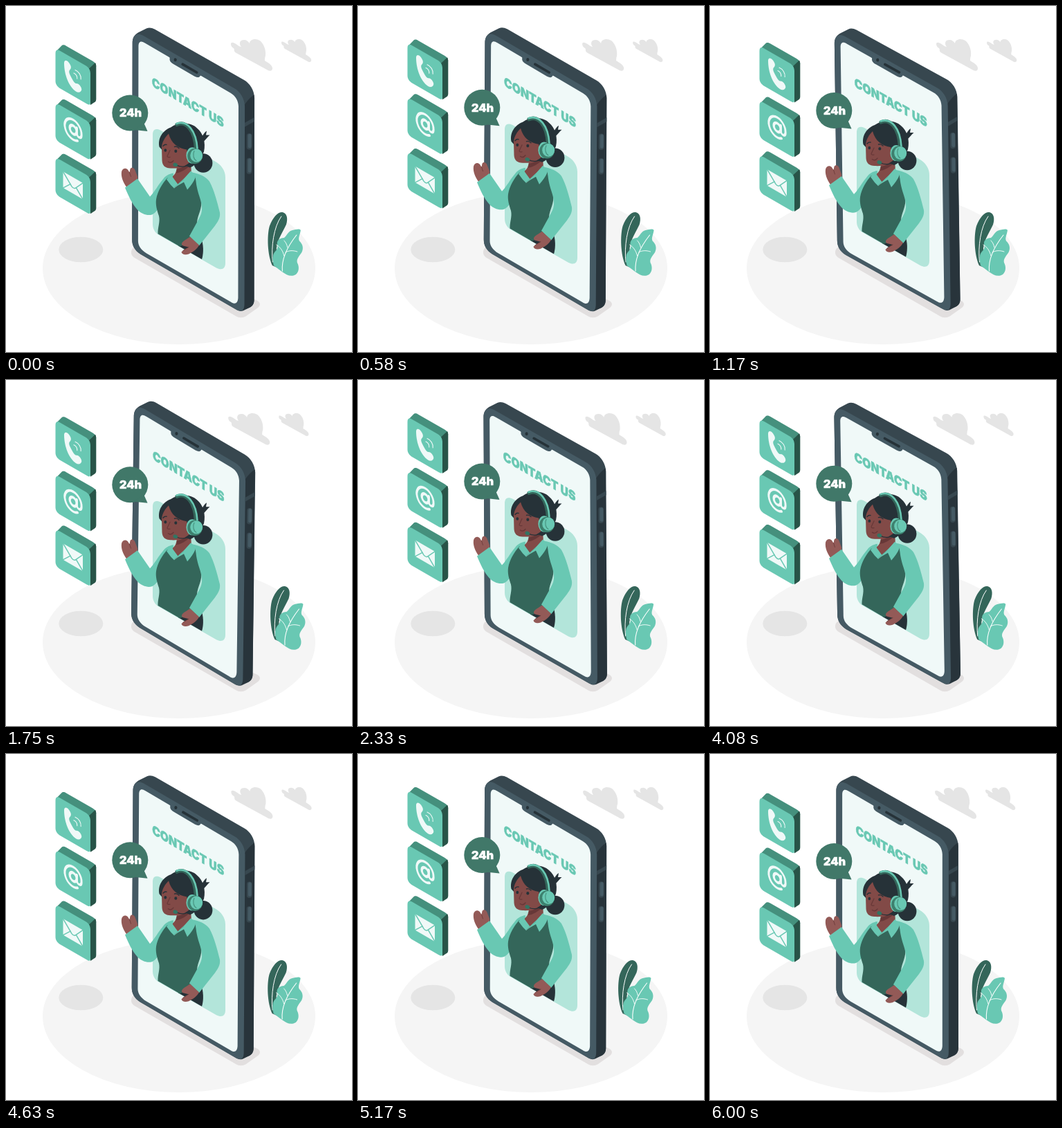
Write an HTML page with a canvas that moves like this. It is 500 px wide and 500 px high and loops after 6.04 s.

```html
<!DOCTYPE html>
<html lang="en">
<head>
<meta charset="utf-8">
<title>Contact us</title>
<style>
html, body { margin: 0; width: 100%; height: 100%; overflow: hidden; background: #fff; }
canvas { display: block; width: 500px; height: 500px; }
</style>
</head>
<body>
<canvas id="stage"></canvas>
<script>
const canvas = document.getElementById('stage');
const ctx = canvas.getContext('2d');
const dpr = window.devicePixelRatio || 1;
canvas.width = canvas.height = 500 * dpr;

const LOOP = 6040, FPS = 24, LEAD = 42;
const TEAL = '#69c8b3', MID = '#45907d', DEEP = '#34665a', INK = '#263238';
const FACE = '#824a47', HAND = '#935a57', SHADE = '#673838';
const STEEL = '#455a64', SLATE = '#37474f', PALE = '#f0f9f8', MINT = '#b3e5da';

function fill(d, color) {
  ctx.fillStyle = color;
  ctx.fill(new Path2D(d));
}

function line(d, color, width) {
  ctx.strokeStyle = color;
  ctx.lineWidth = width;
  ctx.lineCap = ctx.lineJoin = 'round';
  ctx.stroke(new Path2D(d));
}

function oval(x, y, rx, ry, color, turn = 0) {
  ctx.beginPath();
  ctx.ellipse(x, y, rx, ry, turn, 0, Math.PI * 2);
  ctx.fillStyle = color;
  ctx.fill();
}

function label(text, x, y, size, align, color) {
  ctx.font = `900 ${size}px Inter, sans-serif`;
  ctx.textAlign = align;
  ctx.fillStyle = ctx.strokeStyle = color;
  ctx.lineWidth = 0.5;
  ctx.lineJoin = 'round';
  ctx.fillText(text, x, y);
  ctx.strokeText(text, x, y);
}

function at(x, y, draw) {
  ctx.save();
  ctx.translate(x, y);
  draw();
  ctx.restore();
}

// Local axes of the left-facing isometric plane
function iso(x, y, draw) {
  at(x, y, () => {
    ctx.transform(0.866, 0.5, 0, 1, 0, 0);
    draw();
  });
}

// Linear interpolation through evenly spaced keyframes
function keys(values, phase) {
  const p = (phase % 1) * (values.length - 1), i = Math.floor(p);
  return values[i] + (values[i + 1] - values[i]) * (p - i);
}

const floating = p => keys([0, -10, 0], p);
const sway = p => keys([0, 1, 0, -1, 0], p);
const shake = p => keys([0, -1, 2, -4, 4, -4, 4, -4, 2, -1, 0], p);

function floor() {
  oval(250, 379, 197, 110, '#f5f5f5');
  oval(108.3, 352, 32, 18.3, '#e5e5e5');
  fill('M181 356C181 350 186 347 191 348L359 424C368 427 369 432 364 436L347 448C342 451 337 451 332 448L186 364C182 361 181 359 181 356Z', '#e2dfdf');
}

function cloud() {
  fill('M325 55C325 51 330 53 334 56C336 58 339 59 340 59C336 54 338 49 344 49C348 49 350 51 352 54C352 48 361 46 367 50C373 55 376 64 375 72C374 75 374 77 374 79C379 82 386 86 385 91C384 95 380 94 377 92L333 68C328 65 331 63 329 61C327 60 325 58 325 55Z', '#e5e5e5');
}

function button(y) {
  line(`M351 ${y + 4}V${y + 20}`, SLATE, 7.5);
  line(`M351.8 ${y + 3.5}V${y + 19}`, STEEL, 5);
}

function phone() {
  fill('M182 53C182 46 184 42 190 38L202 32C206 30 210 31 214 33L343 106C352 111 358 121 358.5 132V424C358.5 430 356 433 352 435L343 439.5C339 441 336 440 332 437.5L194 358C186 352 182 346 182 337Z', SLATE);
  fill('M344 143C344 140 357 126 358 128L358.5 424C358.5 430 356 433 352 435L342 439Z', '#28343b');
  fill('M182 53C182 43 187 37 197 42L329 118C338 123 344 133 344.5 144V430C344.5 440 340 442 331 437L194 358C186 353 182 346 182 337Z', STEEL);
  fill('M190.7 58C190.7 51 194 49 200 53L324 125C331 129 335 136 335.4 144V421C335 429 331 431 325 427L203 357C195 352 190.7 346 190.7 339Z', PALE);
  fill('M233 70L236 74C235 79 238 81 241 83L272 101C276 103 279 103 280 100C282 99 284 101 287 103L290 99L236 67Z', STEEL);
  oval(244, 77, 2.1, 2.5, INK);
  line('M254.5 83.5L275 95.3', INK, 3.6);
  fill('M344.5 168L358.5 160V166L344.5 174Z', SLATE);
  button(183);
  button(218.5);
  iso(210, 114.9, () => label('CONTACT US', 0, 0, 18.1, 'left', TEAL));
}

function body() {
  // Waving arm
  fill('M174 262C169 255 166 247 167 240C168 235 173 234 176 237L178.5 241L179.5 236C181 233 186 234 187 239L190 247C191 253 188 258 183 263Z', HAND);
  line('M178.5 241L180.5 247', SHADE, 0.8);
  fill('M172 263L190 250L208 276C214 270 220 259 226 252C230 246 235 243 242 242L241 260L224 283C221 293 217 299 211 302C204 304 196 301 190 295C182 286 177 275 172 263Z', TEAL);
  fill('M249 347L256 338L283 338C286 350 285 360 283 366.5Z', INK);
  fill('M233 249C241 248 265 244 274 247C275 259 280 268 282 281C284 293 277 302 276 313C276 325 279 335 280 343L262 344L251 348L219.5 329.7C219 321 223 313 221 304C218 295 216 288 217 280C219 268 226 257 233 249Z', DEEP);
  // Neck and collar
  fill('M247 230L267 222L268 245L243 264L239 248C244 245 247 240 247 230Z', FACE);
  fill('M247 236C254 235 260 231 266 226L267 230C260 237 253 241 246 242Z', SHADE);
  fill('M240 242C237 245 234 248 232 251L238 259L243 264L249 259L241 248Z', TEAL);
  fill('M243 263L258 249L267 239C271 242 274 245 274 248C271 255 267 260 262 266L257 255Z', TEAL);
  line('M243 263L257 251', '#55b29d', 0.8);
  // Resting arm
  fill('M269 241C279 243 288 246 294 254C301 267 305 283 309 299C310 307 306 312 302 318L279 347L265 333L276 313C280 306 284 299 283 291C282 277 275 270 274 247Z', TEAL);
  fill('M266 334L279 346C276 352 270 356 264 359C259 361 254 359 253.5 356C256 353 260 351 264 349L256 347C252 345 254 341 260 338Z', HAND);
  line('M264 349L256 354', SHADE, 0.8);
}

function head() {
  oval(285, 227.5, 13.4, 13.7, INK);
  fill('M282 192C284 187 287 183 290 181L289 187L294.5 187C291 190 289 193 285 197Z', INK);
  fill('M221.5 204C219 191 227 180 238 176C249 168 267 168 276 177C285 184 289 198 286 211C282 220 276 230 266 234L246 226L226 209Z', INK);
  fill('M225 204C226 196 230 190 235 185C239 199 248 206 261 208L267 225C260 232 250 236 238 235C230 235 226 231 225.5 224Z', FACE);
  line('M227 203C228.5 201 230 200.5 232 201', INK, 1.4);
  line('M243.5 204C246 203 248 204 250 206', INK, 1.4);
  oval(230.3, 209, 1.9, 2.2, INK);
  oval(245.3, 210.3, 2, 2.3, INK);
  line('M237 209L233 217.5C233 219 235 219.5 237 219', SHADE, 1.2);
  line('M234.5 225.5C237 227.5 240 226.5 242 224', SHADE, 1.4);
  // Headset
  line('M247 172C260 166 273 180 274.5 207', DEEP, 5.2);
  line('M246.5 170.5C262 165 275 181 276.5 207', TEAL, 2.6);
  line('M266 227C262 233 254 234 247 231', INK, 1.3);
  oval(244.8, 230, 3.4, 2.7, '#327563', 0.35);
  oval(269, 216.5, 8.6, 11.6, TEAL);
  oval(273, 217.5, 10.8, 11.2, '#3d806e');
  oval(275.2, 216.5, 9, 9.5, TEAL);
  line('M272 210C269.5 215 271 222 275 224', MID, 1.1);
}

function agent() {
  fill('M212 187C212 179 216 177 223 180L302 225C311 230 317 238 317 248V372C317 380 312 383 304 379L222 332C216 329 212 323 212 316Z', MINT);
  body();
  head();
}

function bubble() {
  oval(179.3, 155, 26, 26, '#417869');
  fill('M185 179.5L204.6 181.5L199 169Z', '#417869');
  label('24h', 180, 161, 16.2, 'center', '#fff');
}

function handset() {
  fill('M84 83C84 78 88 78.5 91 82.5C94 86.5 95 90 92.5 92.5C90.5 94.5 91 97 93 101C96 107 99 112.5 101.5 112.5C105 112 109 117 109.3 121C109 125 105 126.5 101 124C91 117 84 100 84 83Z', PALE);
  line('M98 97.5C101 99 103 102 102.8 105.5', PALE, 1.1);
  line('M100 93C105 95 109 101 108.2 106.5', PALE, 1.1);
}

function mailSign() {
  iso(97, 100.7, () => {
    line('M6 0A5.8 6 0 1 1 -5.6 0A5.8 6 0 1 1 6 0', PALE, 3.9);
    line('M6.3 -6V2C6.3 8 14 7.5 14 0A14 14.3 0 1 0 7.5 12', PALE, 3.5);
  });
}

function envelope() {
  fill('M82.5 82.5L111 99V122.5L82.5 106Z', PALE);
  line('M82.5 82.5L95 104C96.5 106 98.5 107 100 106.5L111 99', TEAL, 1.5);
  line('M82.5 106L93 100.5M111 122.5L101.5 106', TEAL, 1.5);
}

function tile(y, icon) {
  at(0, y, () => {
    fill('M73 65.5L80 58.4C82 56.3 84 56.5 87 58.2L125 80C129 82.4 130.3 84.5 130.3 88L122 97Z', MID);
    fill('M120 91L129 82.5C130 84 130.3 86 130.3 89V135C130.3 137 129.5 138.5 128 139.5L122 143.5Z', '#285448');
    fill('M71.5 69C71.5 64 74 63 78 65.2L115 86.5C119.5 89 122 93 122 98V140C122 143.5 120.5 144 117 142L78 119.5C74 117 71.5 113 71.5 109Z', TEAL);
    icon();
  });
}

function plant() {
  fill('M385 375C378 360 377 332 381 318C386 305 393 297.5 399.5 298C406 299 408 307 405 316C400 327 393 336 391 350L392 378Z', DEEP);
  line('M385.5 370C383 348 387 319 398 304', '#fff', 1);
  fill('M387 375C386 370 385 366 386 361C387 354 394 353 392.5 346C390 339 396 335 402 335C406 332 408 325 414 324C419 323 424 321 426 324C425 331 422 335 424 339.5C429 344 430.5 350 427.5 356C424.5 361 419.5 365 421 371C424 376 424 384 419 388C412 392 406 389 399 384Z', TEAL);
  line('M399.5 383C398 366 405 350 420 331', '#fff', 1.1);
  line('M402 361C400 353 396 348 391 345', '#fff', 0.9);
  line('M404 356C409 353 415 353 421 355', '#fff', 0.9);
  line('M407 349C406 344 404 341 402 339', '#fff', 0.9);
}

function draw(time) {
  const t = Math.floor((time % LOOP + 4) * FPS / 1000) * 1000 / FPS + LEAD;
  const loop = t / LOOP;
  const lift = floating(loop * 4);

  ctx.setTransform(dpr, 0, 0, dpr, 0, 0);
  ctx.fillStyle = '#fff';
  ctx.fillRect(0, 0, 500, 500);
  floor();

  at(shake(loop), 0, () => {
    cloud();
    ctx.translate(164, 13.4);
    ctx.scale(0.72, 0.72);
    cloud();
  });

  at(270, 235, () => {
    ctx.rotate(sway(loop * 4) * Math.PI / 180);
    ctx.translate(-269.6, -234.3);
    phone();
  });

  at(0, lift, () => {
    agent();
    bubble();
    tile(0, handset);
    tile(78.7, mailSign);
    tile(157.4, envelope);
  });

  at(shake(loop * 2), 0, plant);
}

const start = performance.now();
function tick() {
  draw(performance.now() - start);
  requestAnimationFrame(tick);
}
tick();
</script>
</body>
</html>
```
